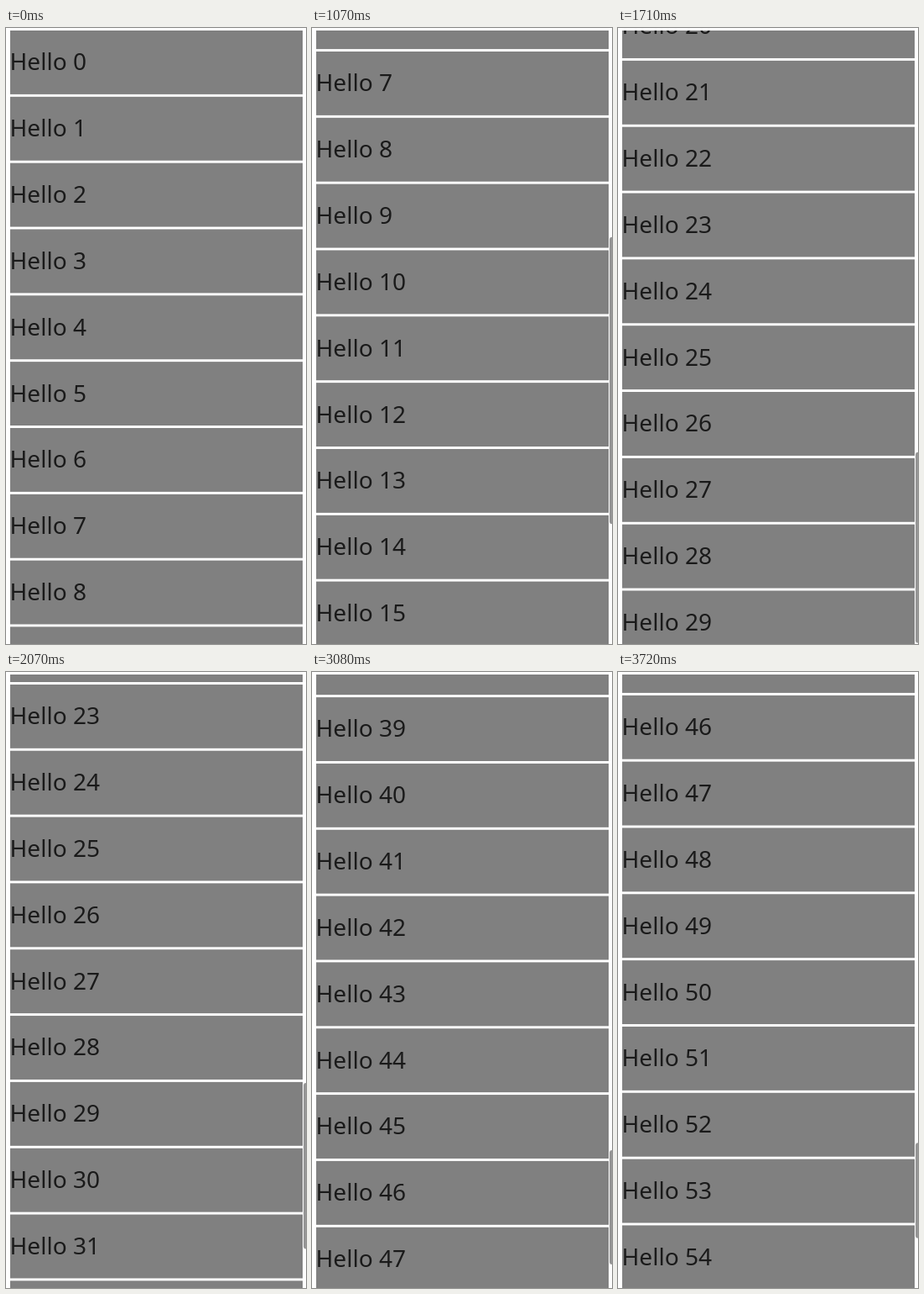
An HTML page with a canvas that plays this animation: 358x733 px, repeating every 5.47 s.

```html
<!DOCTYPE html>
<html lang="en">
<head>
<meta charset="utf-8">
<title>Endless list</title>
<style>
  html, body { margin: 0; width: 100%; height: 100%; overflow: hidden; background: #fff; }
  canvas { display: block; width: 358px; height: 733px; }
</style>
</head>
<body>
<canvas id="stage"></canvas>
<script>
const W = 358, H = 733, LOOP = 5470;
const START = 750, STALL = 2676, RESUME = 3080, END = 3720, STEP = 40, LAG = 330;
const TOP = 3, LEFT = 5, ROW_W = 349, ROW_H = 75.9, PITCH = 78.83, VIEW = 732;
const PAGE = 10, BAR_EASE = 60;

const SWIPES = [
  { start: 730, distance: 660, tau: 114 },
  { start: 1310, distance: 970, tau: 59.8 },
  { start: 2025.3, distance: 1130.3, tau: 65 },
  { start: 2659.2, distance: 841.6, tau: 75 }
];

const canvas = document.getElementById('stage');
const ctx = canvas.getContext('2d');
const dpr = window.devicePixelRatio || 1;
canvas.width = W * dpr;
canvas.height = H * dpr;
ctx.scale(dpr, dpr);

// Picks up speed under the finger, then glides out
function glide({ start, distance, tau }, t) {
  const u = Math.max(0, (t - start) / tau);
  return distance * (1 - (1 + u) * Math.exp(-u));
}

const scrollAt = t => SWIPES.reduce((sum, swipe) => sum + glide(swipe, t), 0);

// A new page of rows loads when the last row comes into view
function loadedRows(t) {
  const visible = (scrollAt(t) + VIEW) / PITCH;
  return PAGE * (Math.floor(visible / PAGE) + 1);
}

// The bar eases towards the loaded row count
function barRows(t) {
  const dt = 5, keep = Math.exp(-dt / BAR_EASE);
  let rows = PAGE;
  for (let s = SWIPES[0].start; s < t; s += dt) {
    const goal = loadedRows(s);
    rows = goal + (rows - goal) * keep;
  }
  return rows;
}

// Screen time to scroll time: fixed steps, with one stall on the way
function clockAt(time) {
  const base = time < RESUME ? START : RESUME;
  const t = Math.min(END, base + Math.floor((time - base) / STEP) * STEP);
  return t < RESUME ? Math.min(t, STALL) : t - LAG;
}

function drawRows(scroll) {
  ctx.save();
  ctx.beginPath();
  ctx.rect(LEFT - 2, TOP, ROW_W + 2, H);
  ctx.clip();
  ctx.font = '28.1px "Noto Sans", "Open Sans", sans-serif';
  const first = Math.floor(scroll / PITCH);
  for (let i = first; i < first + 11; i++) {
    const y = TOP + i * PITCH - scroll;
    ctx.fillStyle = '#808080';
    ctx.fillRect(LEFT, y, ROW_W, ROW_H);
    ctx.fillStyle = '#1a1a1a';
    ctx.fillText('Hello ' + i, 4.5, y + 47.4);
  }
  ctx.restore();
}

function drawBar(scroll, rows) {
  const scale = VIEW / (rows * PITCH);
  ctx.fillStyle = '#969696';
  ctx.beginPath();
  ctx.roundRect(355, TOP + scroll * scale, 6, VIEW * scale, 3);
  ctx.fill();
}

function draw(time) {
  const moving = time >= START;
  const t = moving ? clockAt(time) : 0;
  const scroll = scrollAt(t);
  ctx.fillStyle = '#fff';
  ctx.fillRect(0, 0, W, H);
  drawRows(scroll);
  if (moving) drawBar(scroll, barRows(t));
}

const begin = performance.now();
function tick() {
  draw((performance.now() - begin) % LOOP);
  requestAnimationFrame(tick);
}
tick();
</script>
</body>
</html>
```
